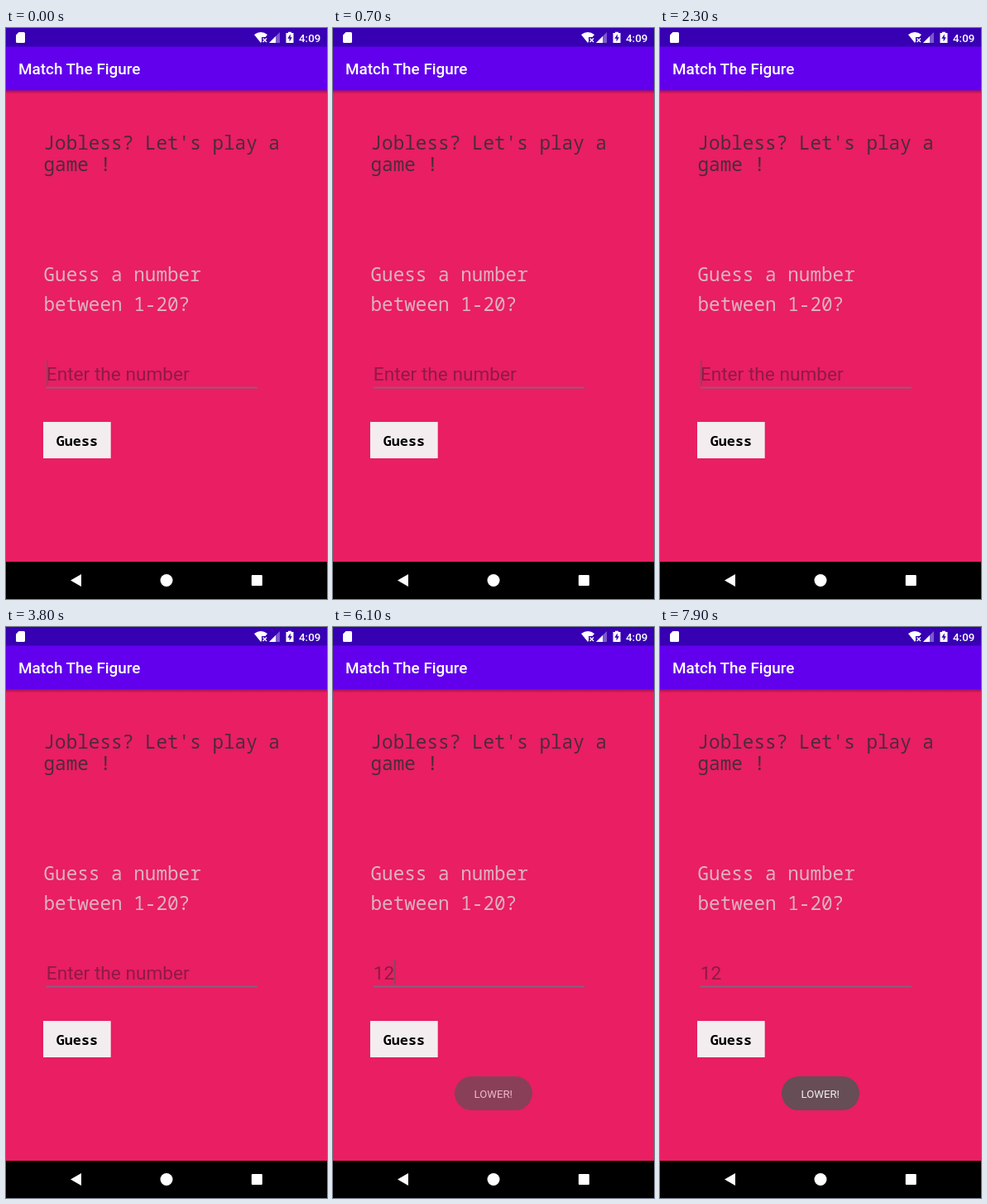
Recreate the animation shown at these times as an HTML page. Size 388 by 690 pixels, loop 8000 ms.

```html
<!DOCTYPE html>
<html lang="en">
<head>
<meta charset="utf-8">
<title>Number game</title>
<style>
html, body { margin: 0; width: 100%; height: 100%; overflow: hidden; background: #e91e63; }
svg { display: block; width: 388px; height: 690px; }
text { font-family: Roboto, sans-serif; white-space: pre; }
.mono { font-family: "Noto Sans Mono", "DejaVu Sans Mono", monospace; font-size: 22.66px; }
.intro { fill: #4a2c3b; font-weight: 500; }
.ask { fill: #dcb4c0; font-weight: 500; }
.button { font-size: 16.8px; font-weight: 700; }
.field { font-size: 22.66px; fill: #8f1a46; }
.caret { fill: #84485f; }

.hint, .one, .two, .toast { animation: 8s step-end infinite; }
.hint { animation-name: hint; }
.one { animation-name: one; }
.two { animation-name: two; }
.toast { animation-name: toast; }
.blink { animation: blink 1s step-end infinite; }

@keyframes blink { 0% { opacity: 1 } 50%, 100% { opacity: 0 } }
@keyframes hint { 0% { opacity: 1 } 57.5%, 100% { opacity: 0 } }
@keyframes one { 0% { opacity: 0 } 57.5% { opacity: 1 } 62.5%, 100% { opacity: 0 } }
@keyframes two { 0% { opacity: 0 } 62.5%, 100% { opacity: 1 } }
@keyframes toast {
  0% { opacity: 0 }
  75% { opacity: .3 }
  76.25% { opacity: .74 }
  77.5% { opacity: .95 }
  78.75%, 100% { opacity: 1 }
}
</style>
</head>
<body>
<svg viewBox="0 0 388 690">
  <defs>
    <linearGradient id="shadow" x2="0" y2="1">
      <stop stop-color="#500030" stop-opacity=".45"/>
      <stop offset="1" stop-color="#500030" stop-opacity="0"/>
    </linearGradient>
  </defs>
  <rect width="388" height="690" fill="#e91e63"/>

  <!-- Status and app bars -->
  <rect width="388" height="23" fill="#3700b3"/>
  <rect y="22.5" width="388" height="53" fill="#6200ee"/>
  <rect y="75.5" width="388" height="4" fill="url(#shadow)"/>
  <g fill="#fff">
    <path d="M15.500 5H21.500Q23 5 23 6.500V16.500Q23 18 21.500 18H13.500Q12 18 12 16.500V8.500Z"/>
    <path d="M300 8Q308 2 316 8L313.500 11H309V16.500L308 18Z"/>
    <path d="M310.500 12.500L315 17M315 12.500L310.500 17" stroke="#fff" stroke-width="1.400"/>
    <path d="M318 18L331 5V18Z" opacity=".35"/>
    <path d="M318 18L326 10V18Z"/>
    <path d="M341 6V4.800H345V6H347.500V18H338.500V6Z"/>
    <path d="M343.800 7.500L340.300 12.700H342.600V16.500L345.900 11.300H343.800Z" fill="#3700b3"/>
    <text x="354" y="17" font-size="13.4" font-weight="500">4:09</text>
    <text x="15" y="56" font-size="18.9" font-weight="500">Match The Figure</text>
  </g>

  <g class="mono intro">
    <text class="mono" x="45.500" y="147">Jobless? Let's play a</text>
    <text class="mono" x="45.500" y="173">game !</text>
  </g>
  <g class="mono ask">
    <text class="mono" x="45.500" y="306">Guess a number</text>
    <text class="mono" x="45.500" y="342">between 1-20?</text>
  </g>

  <!-- Input field -->
  <rect x="48.500" y="433.700" width="255.500" height="1.800" fill="#85627f"/>
  <g class="hint">
    <text class="field" x="48.800" y="425.500">Enter the number</text>
    <rect class="caret blink" x="49" y="402" width="1.800" height="30"/>
  </g>
  <g class="one">
    <text class="field" x="48.800" y="425.500">1</text>
    <rect class="caret" x="61.500" y="402" width="1.800" height="30"/>
  </g>
  <g class="two">
    <text class="field" x="48.800" y="425.500">12</text>
    <rect class="caret blink" x="73.800" y="402" width="1.800" height="30"/>
  </g>

  <rect x="45" y="476" width="81.700" height="44" fill="#f4edf0"/>
  <text class="mono button" x="60.700" y="504.500">Guess</text>

  <g class="toast">
    <rect x="147" y="543" width="94" height="41" rx="20.500" fill="#674d55"/>
    <text x="170.500" y="569" font-size="13.2" fill="#eee">LOWER!</text>
  </g>

  <!-- Navigation bar -->
  <rect y="645" width="388" height="45"/>
  <g fill="#fff">
    <path d="M78 667.500L91 660V675Z"/>
    <circle cx="194" cy="667.500" r="7.500"/>
    <rect x="296.800" y="661" width="13" height="13" rx="1"/>
  </g>
</svg>
</body>
</html>
```
